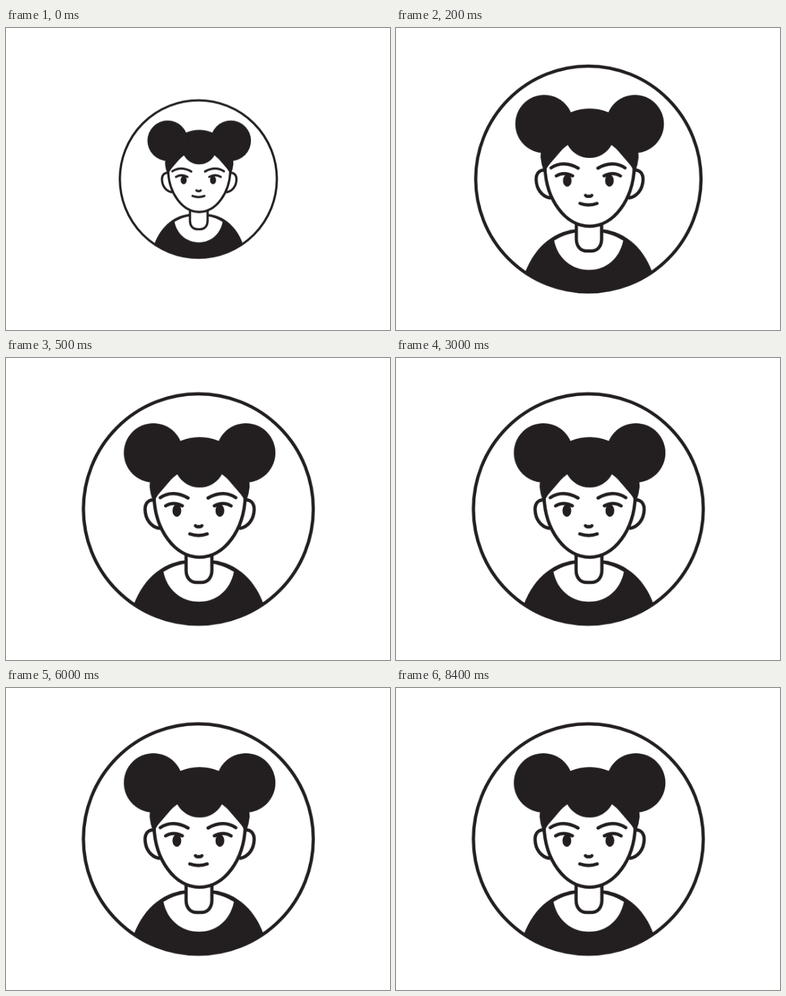
An HTML page for the animation above (8500 ms loop, 566 by 444 pixels).

```html
<!DOCTYPE html>
<html lang="en">
<head>
<meta charset="utf-8">
<title>Portrait badge</title>
<style>
  html, body { margin: 0; width: 100%; height: 100%; overflow: hidden; background: #fff; }
  svg { display: block; width: 566px; height: 444px; }
  #badge { transform-origin: 283.5px 222px; }
  .ink { fill: #231f20; }
  .skin { fill: #fff; }
  .line { fill: none; stroke: #231f20; stroke-width: 5.2; stroke-linecap: round; stroke-linejoin: round; }
  .skin.line { fill: #fff; }
</style>
</head>
<body>
<svg viewBox="0 0 566 444">
  <defs>
    <clipPath id="disc"><circle cx="283.5" cy="222" r="184"/></clipPath>
  </defs>
  <g id="badge">
    <!-- shoulders, collar and neck -->
    <g clip-path="url(#disc)">
      <path class="ink" d="M178 382C192 336 224 307 264 303H305C345 307 377 336 390 382V420H178Z"/>
      <path class="skin" d="M228 321.500C234 351 257 369 284.500 369C312 369 334 351 340 321.500C329 315 318 310.500 305 308.500H264C250 310.500 239 315 228 321.500Z"/>
    </g>
    <path class="skin line" d="M264 290V319C264 331 271 338.500 281 338.500H288C298 338.500 305 331 305 319V290"/>

    <!-- ears and face -->
    <path class="skin line" d="M213 207.500C204 207 198.500 213 198.800 223C199.200 238 208 250 221 252.500"/>
    <path class="skin line" d="M358 207.500C367 207 372.500 213 372.200 223C371.800 238 363 250 350 252.500"/>
    <path class="skin line" d="M213 203C215 255 246 298.500 285.500 298.500C325 298.500 356 255 358 203L321 160H250Z"/>

    <!-- hair -->
    <path class="ink" d="M206 187A79.500 79 0 0 1 365 187Q364 198 360 209H357Q346 186 321 167A40.500 40.500 0 0 1 250 167Q225 186 214 209H211Q207 198 206 187Z"/>
    <circle class="ink" cx="212" cy="133" r="47"/>
    <circle class="ink" cx="359" cy="133" r="47"/>

    <!-- features -->
    <g class="line">
      <path d="M223 204Q243 191 267 204.500"/>
      <path d="M343 204Q323 191 299 204.500"/>
      <path d="M231.500 217Q244 209.500 258 217"/>
      <path d="M335.500 217Q323 209.500 309 217"/>
      <path d="M279 248.500Q281 251 284 249.800Q287 251 289 248.500"/>
      <path d="M270 261.500Q284 266.500 297.500 261.500"/>
    </g>
    <ellipse class="ink" cx="249.300" cy="224.500" rx="7" ry="9.800"/>
    <ellipse class="ink" cx="317.700" cy="224.500" rx="7" ry="9.800"/>

    <circle class="line" cx="283.500" cy="222" r="182.700"/>
  </g>
</svg>
<script>
  const LOOP = 8500, STEP = 100, STEPS = 5;
  const REST = 172 / 185.5;

  // Damped bounce: each step overshoots by a quarter of the last error.
  const scaleAt = n => REST * (n < STEPS ? 1 - 0.317 * (-0.25) ** n : 1);

  const frames = Array.from({ length: STEPS + 1 }, (_, n) => ({
    offset: n * STEP / LOOP,
    transform: `scale(${scaleAt(n)})`,
    easing: 'steps(1, end)'
  }));
  frames.push({ offset: 1, transform: `scale(${REST})` });

  document.getElementById('badge').animate(frames, { duration: LOOP, iterations: Infinity });
</script>
</body>
</html>
```
